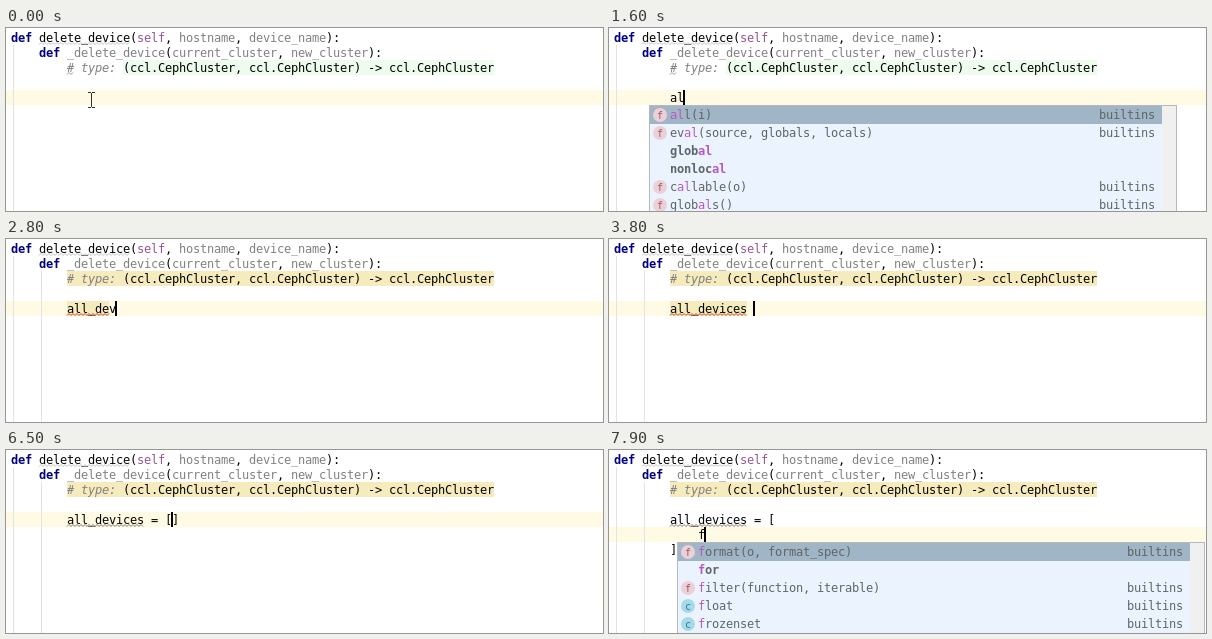
Recreate the animation shown at these times as an HTML page with a canvas. Size 597 by 183 pixels, loop 8000 ms.

```html
<!DOCTYPE html>
<html lang="en">
<head>
<meta charset="utf-8">
<title>Typing in a code editor</title>
<style>
html, body { margin: 0; width: 100%; height: 100%; overflow: hidden; background: #fff; }
canvas { display: block; }
</style>
</head>
<body>
<canvas id="stage" width="597" height="183"></canvas>
<script>
const ctx = document.getElementById('stage').getContext('2d');
const LOOP = 8000, COL = 7, LINE = 15, LEFT = 5, TOP = 2, INDENT = 61;
const GREY = '#808080', YELLOW = '#f6ebbc', RED = '#d0402b';
const FONT = '12px "DejaVu Sans Mono", monospace';

// [time, text before the caret]
const typing = [
  [0, ''], [1400, 'a'], [1600, 'al'], [1700, 'all'], [2000, 'all_'],
  [2500, 'all_d'], [2600, 'all_de'], [2800, 'all_dev'], [3000, 'all_devi'],
  [3100, 'all_devic'], [3300, 'all_device'], [3400, 'all_devices'],
  [3700, 'all_devices '], [5600, 'all_devices ='], [5800, 'all_devices = '],
  [6000, 'all_devices = [']
];
// [time, characters marked as unresolved]
const marked = [[0, 0], [2300, 4], [2700, 6], [3800, 11]];
// [time, x, y] of the mouse pointer
const pointer = [[0, 86, 72], [500, 95, 74], [600, 106, 76], [700, 113, 78]];

// [icon, label]; no icon means a keyword
const alItems = [['f', 'all(i)'], ['f', 'eval(source, globals, locals)'], ['', 'global'],
  ['', 'nonlocal'], ['f', 'callable(o)'], ['f', 'globals()']];
const allItems = [alItems[0], alItems[4]];
const fItems = [['f', 'format(o, format_spec)'], ['', 'for'],
  ['f', 'filter(function, iterable)'], ['c', 'float'], ['c', 'frozenset']];

const latest = (steps, t) => steps.filter(s => s[0] <= t).pop();
const lineTop = n => TOP + n * LINE;

function box(x, y, w, h, color) {
  ctx.fillStyle = color;
  ctx.fillRect(x, y, w, h);
}

// Writes on the character grid and returns the next x.
function write(text, x, y, color = '#000', style = '') {
  ctx.font = style + ' ' + FONT;
  ctx.fillStyle = color;
  for (const ch of text) {
    ctx.fillText(ch, x, y);
    x += COL;
  }
  return x;
}

function writeLine(n, x, parts) {
  for (const [text, color, style] of parts) x = write(text, x, lineTop(n) + 12, color, style);
}

function wave(x, end, n, color) {
  const y = lineTop(n) + 12.5;
  ctx.strokeStyle = color;
  ctx.lineWidth = 1;
  ctx.beginPath();
  for (let i = 0; x + 2 * i <= end; i++) ctx.lineTo(x + 2 * i, y + (i % 2 ? 0 : 2));
  ctx.stroke();
}

function popup(left, top, items, prefix, scroll) {
  const height = items.length * 18;
  box(left, top, 528, height + 2, '#b5b9bd');
  box(left + 1, top + 1, 526, height, '#ebf4fe');
  box(left + 1, top + 1, scroll ? 512 : 526, 18, '#a0b5c5');
  if (scroll) box(left + 513, top + 1, 14, height, '#f0f0f0');
  items.forEach(([icon, label], i) => {
    const y = top + 1 + i * 18, x = left + 21;
    if (icon) {
      ctx.fillStyle = icon === 'f' ? '#ecd0d8' : '#a5daea';
      ctx.beginPath();
      ctx.arc(left + 11, y + 9, 7, 0, 7);
      ctx.fill();
      ctx.font = '10px "DejaVu Sans Mono", monospace';
      ctx.fillStyle = icon === 'f' ? '#9c5560' : '#3f7385';
      ctx.fillText(icon, left + 8, y + 12.5);
      write('builtins', left + 450, y + 13, '#5f6468');
    }
    const style = icon ? '' : 'bold', at = label.indexOf(prefix);
    write(label, x, y + 13, '#5f6468', style);
    // repaint the matching letters
    box(x + at * COL, y, prefix.length * COL, 18, i ? '#ebf4fe' : '#a0b5c5');
    write(prefix, x + at * COL, y + 13, '#b558c0', style);
  });
}

function ibeam(x, y) {
  box(x - 1, y - 7, 1, 14, '#333');
  for (const edge of [y - 8, y + 7]) {
    box(x - 4, edge, 3, 1, '#333');
    box(x, edge, 3, 1, '#333');
  }
}

function draw(t) {
  const split = t >= 6800, checked = t >= 2200;
  const text = latest(typing, t)[1], count = latest(marked, t)[1];
  const row = split ? 5 : 4;
  const stale = t < 4900;

  box(0, 0, 597, 183, '#fff');
  box(0, lineTop(row), 597, LINE, '#fffae3');
  box(7, 17, 1, 166, '#e3e3e3');
  if (t >= 2100) box(35, 32, 1, 151, '#e3e3e3');

  wave(33, 124, 0, '#c4c4c4');
  writeLine(0, LEFT, [['def ', '#000080', 'bold'], ['delete_device('], ['self', '#94558d'], [', '],
    ['hostname', GREY], [', '], ['device_name', GREY], ['):']]);
  writeLine(1, 33, [['def ', '#000080', 'bold'], ['_delete_device', GREY], ['('],
    ['current_cluster', GREY], [', '], ['new_cluster', GREY], ['):']]);

  if (checked) box(INDENT, 32, 427, LINE, YELLOW);
  else {
    box(117, 32, 371, LINE, '#edfced');
    wave(INDENT, 68, 2, '#999');
  }
  writeLine(2, INDENT, [['# type: ', GREY, 'italic'],
    ['(ccl.CephCluster, ccl.CephCluster) -> ccl.CephCluster']]);

  if (count) {
    const end = INDENT + count * COL;
    if (stale) box(INDENT, 62, count * COL, LINE, YELLOW);
    wave(INDENT, end, 4, stale ? RED : '#8b7065');
  }
  if (t >= 6100 && t < 6500) wave(152, 159, 4, RED);

  const end = write(text, INDENT, lineTop(4) + 12);
  let caret = end;
  if (split) {
    write(']', INDENT, lineTop(6) + 12);
    caret = write(t >= 7800 ? 'f' : '', INDENT + 4 * COL, lineTop(5) + 12);
  } else if (t >= 6000) write(']', end, lineTop(4) + 12);

  if (t >= 1600 && t < 1800) popup(40, 77, alItems, 'al', true);
  else if (t >= 1800 && t < 2000) popup(40, 77, allItems, 'all', false);
  else if (t >= 7900) popup(68, 92, fItems, 'f', true);

  const blinkOff = t < 200 || (t >= 700 && t < 1200);
  if (!blinkOff) box(caret - 1, lineTop(row), 2, LINE, '#000');
  if (t < 1400) ibeam(...latest(pointer, t).slice(1));
}

function tick() {
  draw(performance.now() % LOOP);
  requestAnimationFrame(tick);
}
tick();
</script>
</body>
</html>
```
